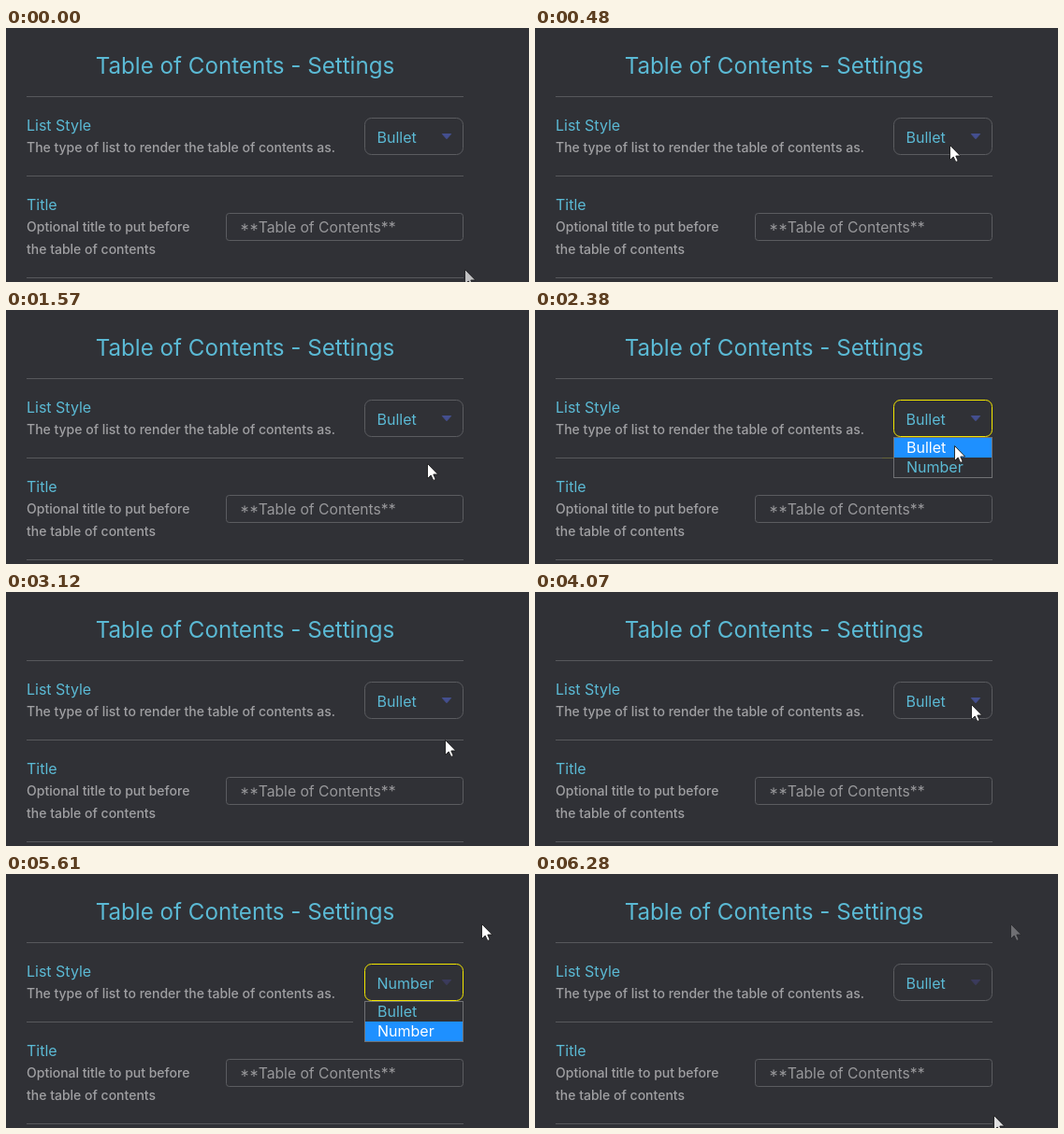
Recreate the animation shown at these times as an HTML page. Size 559 by 272 pixels, loop 6.35 s.

```html
<!DOCTYPE html>
<html lang="en">
<head>
<meta charset="utf-8">
<title>Settings</title>
<style>
html, body { margin: 0; width: 100%; height: 100%; overflow: hidden; background: #303136; }
svg { display: block; font: 16px Inter, sans-serif; fill: #5bbad5; }
.line { fill: #57585c; }
.note { font-size: 14px; font-weight: 500; fill: #a0a0a3; }
.box { fill: none; stroke: #5b5c60; }
.pointer { fill: #fff; stroke: #1c1c1e; stroke-width: .9; }
</style>
</head>
<body>
<svg width="559" height="272" viewBox="0 0 559 272">
  <defs>
    <path id="arrow" d="M.5 .5V16.5L4.2 13 6.8 18.5 9.2 17.4 6.8 12H11.7Z"/>
  </defs>
  <text x="255.5" y="49" font-size="24.15" text-anchor="middle">Table of Contents - Settings</text>
  <g class="line">
    <rect x="22" y="73" width="467" height="1"/>
    <rect x="22" y="158" width="467" height="1"/>
    <rect x="22" y="267" width="467" height="1"/>
  </g>
  <text x="22" y="110">List Style</text>
  <text class="note" x="22" y="133">The type of list to render the table of contents as.</text>
  <text x="22" y="195">Title</text>
  <text class="note" x="22" y="218">Optional title to put before</text>
  <text class="note" x="22" y="242">the table of contents</text>
  <rect class="box" x="235.5" y="198.5" width="253" height="29" rx="3"/>
  <text x="250" y="219" font-size="15.7" fill="#98989b">**Table of Contents**</text>

  <rect class="box" id="select" x="383.5" y="96.5" width="105" height="39" rx="7"/>
  <text id="value" x="396.5" y="123">Bullet</text>
  <path id="caret" d="M466.3 113.5H475.7L471 118.7Z" stroke-linejoin="round"/>
  <g id="menu">
    <rect id="seam" x="371" y="158" width="12" height="1"/>
    <rect x="383.5" y="136.5" width="105" height="43" fill="#303136" stroke="#707174"/>
    <rect id="mark" x="384" width="104" height="21" fill="#1e90ff"/>
    <text id="bullet" x="397" y="153">Bullet</text>
    <text id="number" x="397" y="174">Number</text>
  </g>
  <use class="pointer" id="mouse" href="#arrow"/>
  <use class="pointer" id="next" href="#arrow" x="490" y="258"/>
</svg>
<script>
const LOOP = 6350, CLOSE = 5940, MENU_DELAY = 80;
const BLUE = "#5bbad5", BACK = "#303136";

// Pointer moves in order: start, end, and where it lands
const moves = [
  [0, 600, 441, 120],
  [810, 1500, 450, 164],
  [1700, 2000, 448, 118],
  [2240, 2380, 448, 145],
  [2450, 2590, 450, 164],
  [3070, 3400, 516, 143],
  [3860, 4190, 458, 116],
  [4450, 4680, 508, 53]
];
// Times at which the select gains and loses focus
const focus = [[600, 1570], [2030, 2850], [4190, CLOSE]];

const $ = id => document.getElementById(id);
const set = (id, attrs) => {
  for (const k in attrs) $(id).setAttribute(k, attrs[k]);
};
const clamp = u => Math.min(1, Math.max(0, u));
const easeOut = u => 1 - (1 - u) ** 2;

function pointerAt(t) {
  let x = 490, y = 258;
  for (const [start, end, toX, toY] of moves) {
    const u = easeOut(clamp((t - start) / (end - start)));
    x += (toX - x) * u;
    y += (toY - y) * u;
  }
  return [Math.round(x), Math.round(y)];
}

function draw(t) {
  const [x, y] = pointerAt(t);
  const span = focus.find(([a, b]) => t >= a && t < b);
  const open = span && t >= span[0] + MENU_DELAY;
  const late = t >= focus[2][0] + MENU_DELAY;
  const keyed = t >= 5540 && t < CLOSE;
  const second = keyed || (y >= 158 && x < 489);
  const fade = clamp((t - CLOSE) / 340);
  const caret = late ? "#3b3b5c" : "#444f8f";

  set("select", { style: span ? "stroke:#f2e600" : "" });
  set("caret", { fill: caret, stroke: caret });
  $("value").textContent = keyed ? "Number" : "Bullet";

  set("menu", { visibility: open ? "visible" : "hidden" });
  set("seam", { fill: late ? BACK : "#66653c" });
  set("mark", { y: second ? 158 : 137 });
  set("bullet", { fill: second ? BLUE : "#fff" });
  set("number", { fill: second ? "#fff" : BLUE });

  set("mouse", { x, y, opacity: t < 70 ? .7 : 1 - .7 * fade });
  set("next", { opacity: .85 * fade });
}

function tick(now) {
  draw(now % LOOP);
  requestAnimationFrame(tick);
}
draw(0);
requestAnimationFrame(tick);
</script>
</body>
</html>
```
